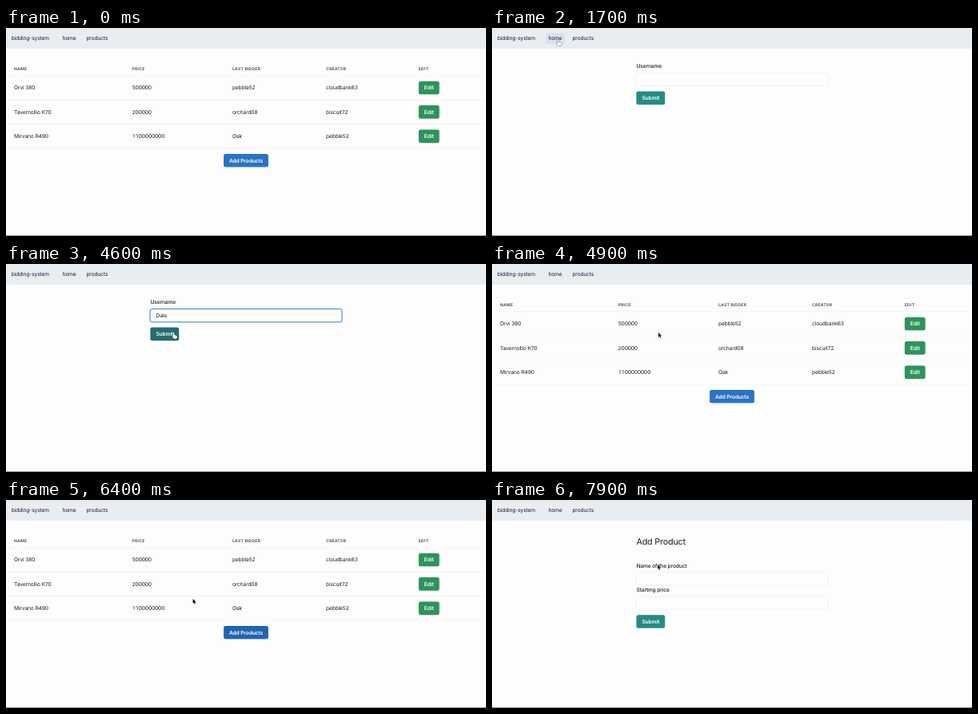
These frames come from a looping animation (600x261 px, 8000 ms). An HTML page with a canvas:

```html
<!DOCTYPE html>
<html lang="en">
<head>
<meta charset="utf-8">
<title>bidding-system</title>
<style>
  html, body { margin: 0; width: 100%; height: 100%; overflow: hidden; background: #fdfdfd; }
  canvas { display: block; width: 600px; height: 261px; }
</style>
</head>
<body>
<canvas id="stage"></canvas>
<script>
const LOOP = 8000;
const STEP = 100;
const SCALE = 600 / 1440; // the page is laid out 1440 units wide
const FORM = { x: 432, w: 576 };
const COLORS = {
  page: '#fdfdfd', header: '#e8edf2', hover: '#d8e2ee', ink: '#1a202c', head: '#4a5568',
  line: '#e6ebf0', field: '#dfe4ea', focus: '#2f7bc8', edge: '#949494',
  teal: '#268a86', tealDark: '#246c6f', green: '#2d945a', blue: '#2a73c5', blueDark: '#2264b0'
};

const COLUMNS = [24, 378, 679, 960, 1238];
const HEADINGS = ['NAME', 'PRICE', 'LAST BIDDER', 'CREATOR', 'EDIT'];
const ROWS = [
  ['Orvi 380', '500000', 'pebble52', 'cloudbank63'],
  ['Tavernollio K70', '200000', 'orchard08', 'biscuit72'],
  ['Mirvano R490', '1100000000', 'Oak', 'pebble52']
];

const TYPED = 'Dale';
const KEY_TIMES = [3200, 3500, 3700, 3800];
const FOCUS_TIME = 2900;

// [time, x, y] in stage pixels
const PATH = [
  [100, 212, 88], [300, 200, 54.5], [400, 200, 54.5], [700, 86, 18], [800, 86, 18],
  [1200, 82.5, 15.2], [1800, 82.5, 15.2], [2300, 206, 84], [2500, 207, 83], [2800, 211.5, 64],
  [3900, 211.5, 64], [4000, 204, 82], [4100, 204, 82], [4400, 209.5, 86.5], [4700, 209.5, 86.5],
  [4900, 208, 86], [5000, 208, 86], [5400, 204, 118], [5900, 290, 166], [6100, 294, 172],
  [6400, 233.6, 124], [6500, 226, 126], [6800, 288, 168], [7700, 288, 168], [7900, 207, 81], [8000, 207, 81]
];

const ARROW = new Path2D('M0 0V14L3.2 11L5.5 16L7.8 15L5.6 10.2H10Z');
const HAND = new Path2D('M-2 1a2 2 0 0 1 4 0v5l6 1.5q3 1 2.5 4l-1.5 6h-8l-5-6q-1-2.5 1-2.5l1 1.5z');
const BEAM = new Path2D('M-3-8Q0-8 0-6Q0-8 3-8M0-6V6M-3 8Q0 8 0 6Q0 8 3 8M-1.5 1H1.5');

const canvas = document.getElementById('stage');
const ctx = canvas.getContext('2d');
const dpr = window.devicePixelRatio || 1;
canvas.width = 600 * dpr;
canvas.height = 261 * dpr;
ctx.textRendering = 'geometricPrecision';

const between = (t, from, to) => t >= from && t < to;

function text(str, x, centerY, { size = 16, weight = 400, color = COLORS.ink, align = 'left', spacing = -0.02 } = {}) {
  ctx.font = `${weight} ${size}px Inter, sans-serif`;
  ctx.letterSpacing = `${size * spacing}px`;
  ctx.textAlign = align;
  ctx.fillStyle = color;
  ctx.fillText(str, x, centerY + size * 0.364);
}

// Tabular figures: every digit takes the width of a zero.
function figures(str, x, centerY) {
  ctx.font = '400 16px Inter, sans-serif';
  ctx.letterSpacing = '-0.32px';
  const advance = ctx.measureText('0').width;
  [...str].forEach((digit, i) => text(digit, x + (i + 0.5) * advance, centerY, { align: 'center' }));
}

function box(x, y, w, h, fill, radius = 6) {
  ctx.beginPath();
  ctx.roundRect(x, y, w, h, radius);
  ctx.fillStyle = fill;
  ctx.fill();
}

function button(label, x, y, w, fill) {
  box(x, y, w, 40, fill);
  text(label, x + w / 2, y + 20, { weight: 600, color: '#fff', align: 'center' });
}

function rule(y) {
  ctx.fillStyle = COLORS.line;
  ctx.fillRect(0, y, 1440, 1.2);
}

function field(label, y, focused) {
  text(label, FORM.x + 1, y - 20, { weight: 500 });
  const inset = focused ? 0 : 0.5;
  ctx.beginPath();
  ctx.roundRect(FORM.x + inset, y + inset, FORM.w - 2 * inset, 40 - 2 * inset, 6);
  ctx.lineWidth = focused ? 2.4 : 1.2;
  ctx.strokeStyle = focused ? COLORS.focus : COLORS.field;
  ctx.stroke();
}

function drawHeader(homeHover) {
  ctx.fillStyle = COLORS.header;
  ctx.fillRect(0, 0, 1440, 62.4);
  if (homeHover) box(161, 15, 58, 33, COLORS.hover);
  text('bidding-system', 16, 31.2);
  text('home', 169, 31.2);
  text('products', 241, 31.2);
}

function drawProducts(t) {
  HEADINGS.forEach((label, i) =>
    text(label, COLUMNS[i], 122.5, { size: 12, weight: 700, color: COLORS.head, spacing: 0.05 }));
  rule(143);
  ROWS.forEach(([name, price, bidder, creator], r) => {
    const top = 144 + r * 73;
    const middle = top + 36;
    text(name, COLUMNS[0], middle);
    figures(price, COLUMNS[1], middle);
    text(bidder, COLUMNS[2], middle);
    text(creator, COLUMNS[3], middle);
    button('Edit', COLUMNS[4], top + 16, 62, COLORS.green);
    rule(top + 72);
  });
  button('Add Products', 653, 379, 134, between(t, 5800, 7000) ? COLORS.blueDark : COLORS.blue);
}

function drawLogin(t) {
  const focused = t >= FOCUS_TIME;
  field('Username', 135, focused);
  const over = between(t, 2200, 2600) || t >= 4200;
  button('Submit', FORM.x + 1, 191, 86, over ? COLORS.tealDark : COLORS.teal);
  if (!focused) return;

  const count = KEY_TIMES.filter(k => k <= t).length;
  const value = TYPED.slice(0, count);
  text(value, 450, 155);
  const lastKey = count ? KEY_TIMES[count - 1] : FOCUS_TIME;
  if ((t - lastKey) % 1000 < 500) {
    ctx.fillStyle = COLORS.ink;
    ctx.fillRect(450 + (count ? ctx.measureText(value).width : 0), 145, 1.3, 20);
  }
}

function drawAddProduct() {
  text('Add Product', FORM.x + 1, 125, { size: 26 });
  field('Name of the product', 218);
  field('Starting price', 290);
  button('Submit', FORM.x + 1, 346, 86, COLORS.teal);
}

function pointerAt(t) {
  const i = Math.max(1, PATH.findIndex(p => p[0] >= t));
  const [t0, x0, y0] = PATH[i - 1];
  const [t1, x1, y1] = PATH[i];
  const u = (t - t0) / (t1 - t0);
  const k = u * u * (3 - 2 * u);
  return [x0 + (x1 - x0) * k, y0 + (y1 - y0) * k];
}

function drawPointer(t) {
  if (t < 100 || between(t, 3300, 4000)) return;
  const [x, y] = pointerAt(t);
  const onButton = x > 272 && x < 328 && y > 158 && y < 175;
  const hand = between(t, 900, 1900) || between(t, 2200, 2600) || between(t, 4200, 4800) ||
    (between(t, 5000, 7000) && onButton);
  ctx.save();
  ctx.translate(x / SCALE, y / SCALE);
  ctx.lineJoin = 'round';
  if (between(t, 2700, 3300)) {
    ctx.strokeStyle = '#111';
    ctx.lineWidth = 1.6;
    ctx.stroke(BEAM);
  } else {
    ctx.strokeStyle = hand ? '#111' : '#fff';
    ctx.fillStyle = hand ? '#fff' : '#000';
    ctx.lineWidth = hand ? 1.5 : 2;
    ctx.stroke(hand ? HAND : ARROW);
    ctx.fill(hand ? HAND : ARROW);
  }
  ctx.restore();
}

function render(t) {
  ctx.setTransform(dpr * SCALE, 0, 0, dpr * SCALE, 0, 0);
  ctx.fillStyle = COLORS.page;
  ctx.fillRect(0, 0, 1440, 627);
  drawHeader(between(t, 1500, 1900));
  if (between(t, 1600, 4800)) drawLogin(t);
  else if (t >= 7000) drawAddProduct();
  else drawProducts(t);
  ctx.fillStyle = COLORS.edge;
  ctx.fillRect(0, 260 / SCALE, 1440, 3);
  drawPointer(t);
}

let start;
function tick(now) {
  start ??= now;
  render(Math.floor(((now - start) % LOOP) / STEP) * STEP);
  requestAnimationFrame(tick);
}
render(0);
requestAnimationFrame(tick);
</script>
</body>
</html>
```
